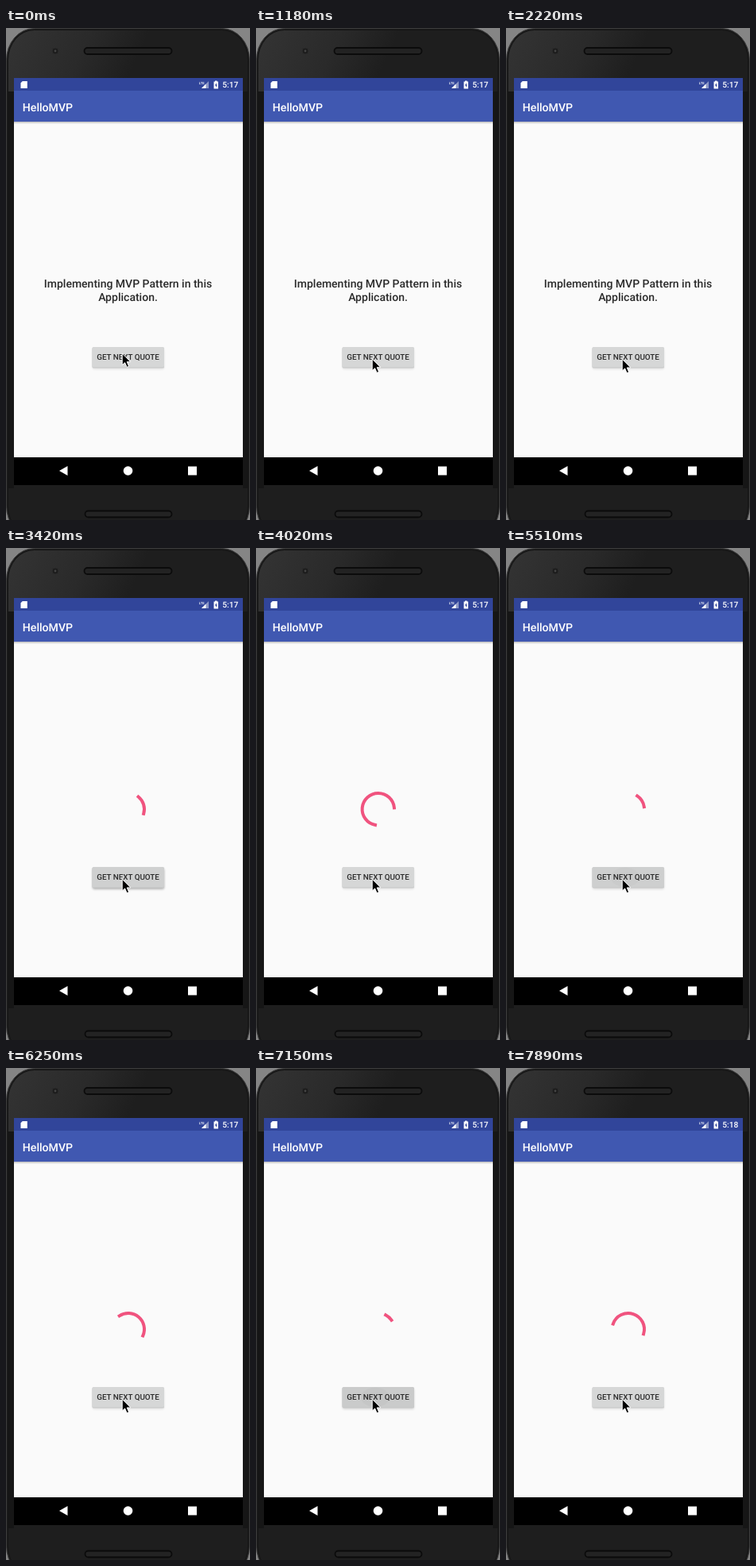
Recreate the animation shown at these times as an HTML page. Size 307 px wide and 620 px high, loop 8000 ms.

```html
<!DOCTYPE html>
<html lang="en">
<head>
<meta charset="utf-8">
<title>HelloMVP</title>
<style>
  html, body { margin: 0; width: 100%; height: 100%; overflow: hidden; background: #858585; }
  svg { display: block; width: 307px; height: 620px; }
  text { font-family: Roboto, "Open Sans", sans-serif; font-weight: 500; text-rendering: geometricPrecision; }
  .quote { font-size: 14px; fill: #2a2a2a; text-anchor: middle; }
</style>
</head>
<body>
<svg viewBox="0 0 307 620">
  <defs>
    <linearGradient id="sheen" gradientUnits="userSpaceOnUse" x1="0" y1="0" x2="150" y2="70">
      <stop offset="0" stop-color="#343434"/>
      <stop offset=".6" stop-color="#2a2a2a"/>
      <stop offset="1" stop-color="#1e1e1e"/>
    </linearGradient>
    <linearGradient id="barShadow" x2="0" y2="1">
      <stop offset="0" stop-opacity=".25"/>
      <stop offset="1" stop-opacity="0"/>
    </linearGradient>
    <filter id="soft" x="-20%" y="-50%" width="140%" height="200%">
      <feGaussianBlur stdDeviation="1.8"/>
    </filter>
  </defs>

  <!-- phone -->
  <rect x=".5" y=".5" width="306" height="642" rx="35" ry="40" fill="#1c1c1c" stroke="#3c3c3c"/>
  <rect x="2.500" y="2.500" width="302" height="638" rx="33" ry="38" fill="url(#sheen)" stroke="#151515"/>
  <rect x="3" y="80" width="7" height="500" fill="#161616"/>
  <rect x="298" y="80" width="6" height="500" fill="#161616"/>
  <circle cx="62" cy="29" r="4" fill="#1c1c1c" stroke="#2b2b2b"/>
  <circle cx="62" cy="29" r="1.400" fill="#444"/>
  <g fill="#232323" stroke="#0b0b0b" stroke-width="1.800">
    <rect x="98.500" y="25" width="110" height="8" rx="4"/>
    <rect x="99.500" y="608.500" width="109" height="8" rx="4"/>
  </g>

  <!-- screen -->
  <rect x="10" y="118" width="288" height="423" fill="#fafafa"/>
  <rect x="10" y="118" width="288" height="3" fill="url(#barShadow)"/>
  <rect x="10" y="63" width="288" height="16" fill="#31459a"/>
  <rect x="10" y="79" width="288" height="39" fill="#4058b1"/>
  <rect x="10" y="541" width="288" height="35" fill="#000"/>
  <g fill="#fff">
    <path d="M20.800 67H26.800V76H18.500V69.300Z"/>
    <path d="M246 76L255 67V76Z" opacity=".45"/>
    <path d="M246 76L251.500 70.500V76Z"/>
    <text x="242.800" y="70.500" font-size="4.3">LTE</text>
    <path d="M263 66.500H265.500V67.500H267V76.500H261.500V67.500H263Z"/>
    <path d="M264.700 69L262.800 72.500H264V75L265.900 71.500H264.700Z" fill="#31459a"/>
    <text id="clock" x="272.300" y="75.300" font-size="10.2"></text>
    <text x="20.800" y="104.600" font-size="14.1">HelloMVP</text>
    <path d="M67 558L77.500 552V564Z"/>
    <circle cx="153.500" cy="558" r="5.800"/>
    <rect x="229" y="552.500" width="11" height="11"/>
  </g>

  <text class="quote" id="line1" x="153.500" y="327.300"></text>
  <text class="quote" id="line2" x="153.500" y="343.500"></text>
  <path id="spinner" fill="none" stroke="#f0537f" stroke-width="4" stroke-linecap="square"/>

  <!-- button -->
  <rect id="lift" x="109" y="404" width="90" height="26" rx="2" filter="url(#soft)"/>
  <rect x="108.500" y="402.500" width="90.500" height="26" rx="1.500" fill="#c6c6c6"/>
  <rect x="108.500" y="402" width="90.500" height="25.500" rx="1.500" fill="#d6d7d7"/>
  <rect id="tint" x="108.500" y="402" width="90.500" height="25.500" rx="1.500"/>
  <ellipse id="ripple" cx="150" cy="415" rx="18" ry="12.500"/>
  <text x="153.500" y="418.300" font-size="9.85" fill="#2a2a2a" text-anchor="middle">GET NEXT QUOTE</text>

  <path id="cursor" d="M0 0V14.800L3.400 11.700L5.900 17.400L8.400 16.300L6 10.700H10.600Z" fill="#000" stroke="#fff" stroke-width="1"/>
</svg>
<script>
const LOOP = 8000, STEP = 148;
const $ = id => document.getElementById(id);

// [time, value] lists: each value holds until the next time
const quotes = [
  [0, ["Implementing MVP Pattern in this", "Application."]],
  [3420, ["", ""]],
  [4470, ["You only live once, but if you do it right,", "once is enough."]],
  [5360, ["", ""]],
  [6550, ["Be the change that you wish to see in the", "world."]],
  [7150, ["", ""]]
];
const cursorY = [
  [0, 410], [150, 411], [450, 412.5], [600, 414], [890, 419], [1040, 418], [1180, 417],
  [1480, 461], [1930, 440], [2080, 419], [2220, 417.3]
];
const clockText = [[0, "5:17"], [7440, "5:18"]];

// start: when the spin began; show and hide: when it is visible
const loads = [
  { start: 3250, show: 3420, hide: 4320, lift: .2, tint: .03, ripple: 0 },
  { start: 5360, show: 5360, hide: 6400, lift: .05, tint: .05, ripple: .03 },
  { start: 7030, show: 7150, hide: 8000, lift: .05, tint: .055, ripple: .025 }
];

const valueAt = (list, t) => list.filter(([from]) => from <= t).pop()[1];

const cubic = (a, b, c, d, s) => {
  const r = 1 - s;
  return r * r * r * a + 3 * r * r * s * b + 3 * r * s * s * c + s * s * s * d;
};

// Easing over a curve from (x0, 0) to (x1, 1) with controls (c0, 0) and (c1, 1)
function ease(x, x0, c0, c1, x1) {
  if (x <= x0) return 0;
  if (x >= x1) return 1;
  let lo = 0, hi = 1;
  for (let i = 0; i < 24; i++) {
    const mid = (lo + hi) / 2;
    if (cubic(x0, c0, c1, x1, mid) < x) lo = mid; else hi = mid;
  }
  return cubic(0, 0, 1, 1, lo);
}

function arcPath(age) {
  const cx = 153.8, cy = 329.2, r = 20.2;
  const x = age % 1333 / 1333;
  const turn = age * 720 / 4444 + x * 90 - 90;
  const from = turn + 270 * ease(x, .5, .7, .6, 1);
  const to = Math.max(from + .5, turn + 270 * ease(x, 0, .2, .1, .5));
  const point = deg => {
    const a = deg * Math.PI / 180;
    return `${cx + r * Math.cos(a)} ${cy + r * Math.sin(a)}`;
  };
  return `M${point(from)}A${r} ${r} 0 ${to - from > 180 ? 1 : 0} 1 ${point(to)}`;
}

function render(t) {
  const [first, second] = valueAt(quotes, t);
  $("line1").textContent = first;
  $("line2").textContent = second;
  $("clock").textContent = valueAt(clockText, t);
  $("cursor").setAttribute("transform", `translate(146.2 ${valueAt(cursorY, t)})`);

  const load = loads.find(l => t >= l.show && t < l.hide);
  let press = 0;
  if (load) {
    const shown = Math.floor((t - load.show) / STEP) * STEP;
    press = Math.max(0, 1 - shown / 450);
    $("spinner").setAttribute("d", arcPath(load.show + shown - load.start));
  }
  $("spinner").style.display = load ? "" : "none";
  $("lift").style.opacity = .1 + (load ? load.lift * press : 0);
  $("tint").style.opacity = load ? load.tint * press : 0;
  $("ripple").style.opacity = load ? load.ripple * press : 0;
}

const begin = performance.now();
function tick() {
  render((performance.now() - begin) % LOOP);
  requestAnimationFrame(tick);
}
render(0);
requestAnimationFrame(tick);
</script>
</body>
</html>
```
